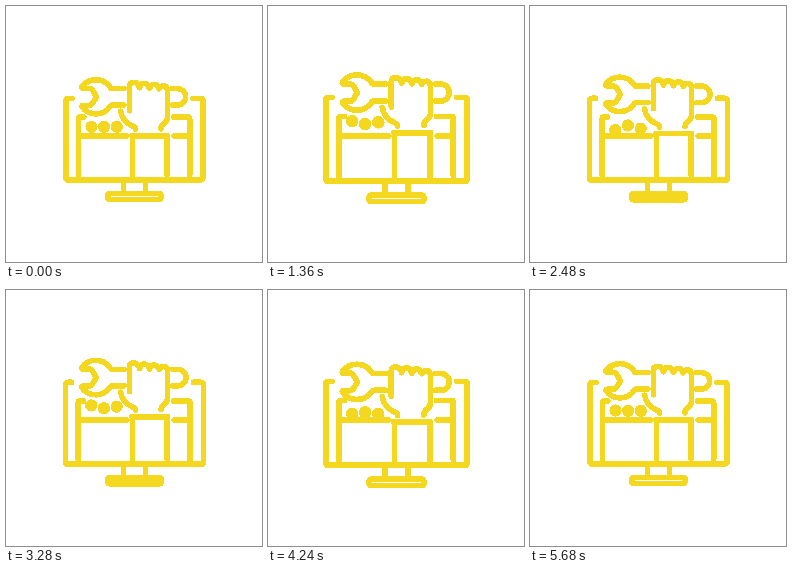
Recreate the animation shown at these times as an HTML page. Size 256 by 256 pixels, loop 5.76 s.

```html
<!DOCTYPE html>
<html lang="en">
<head>
<meta charset="utf-8">
<title>Repair icon</title>
<style>
  html, body { margin: 0; height: 100%; overflow: hidden; background: #fff; }
  svg { display: block; width: 100vw; height: 100vh; shape-rendering: crispEdges; }
  .line { fill: none; stroke: #f3d81f; stroke-width: 5.6; stroke-linecap: round; stroke-linejoin: round; }
  circle { fill: #f3d81f; }
</style>
</head>
<body>
<svg viewBox="0 0 256 256">
  <g id="icon">
    <g class="line">
      <!-- monitor and stand -->
      <path d="M66 92.5H62.5Q60 92.5 60 95V171.5Q60 174 62.5 174H194.5Q197 174 197 171.5V95Q197 92.5 194.5 92.5H187"/>
      <path d="M117.500 175V187M139.500 175V187"/>
      <rect x="102" y="187.500" width="53" height="6" rx="1.500"/>
      <!-- browser window -->
      <path d="M78 111H74.500Q72.500 111 72.500 113V169M72.500 130H121"/>
      <path d="M167.500 111H182Q183.700 111 183.700 113V169M168 130H183.700"/>
      <path id="forearm"/>
    </g>
    <circle r="6.100" cx="85.500"/>
    <circle r="6.100" cx="98"/>
    <circle r="6.100" cx="110.800"/>
    <g id="hand" class="line">
      <!-- wrench, centred on y = 0 -->
      <path d="M118 -8.200H106.500Q104.800 -8.200 104 -10A17.300 17.300 0 0 0 76 -10Q75.500 -8.500 77 -8.500H83Q85.500 -8.500 87 -6L90.500 0L87 6Q85.500 8.500 83 8.500H77Q75.500 8.500 76 10A17.300 17.300 0 0 0 104 10Q104.800 8.200 106.500 8.200H118"/>
      <path d="M166.500 -8.200H171.500a8.200 8.200 0 0 1 0 16.400H166.500"/>
      <!-- fist and thumb -->
      <path d="M123.500 14V-11Q123.500 -14.500 128 -14.500Q132 -14.500 133.500 -9Q134.500 -13.500 138 -13.500Q142 -13.500 143.500 -8.500Q145 -12.500 148 -12.500Q151.500 -12.500 153 -8Q154.500 -11 158 -11Q161.500 -10.500 161.500 -6V20Q161.500 24 158 26.500Q155 28.500 155 32"/>
      <path d="M114.700 14.500Q116 24.500 127 29.500Q129.500 30.500 129.500 32.500"/>
    </g>
  </g>
</svg>
<script>
const LOOP = 5760, CYCLE = 1920, STEP = 80;
const $ = selector => document.querySelector(selector);
const dots = [...document.querySelectorAll('circle')];
const dotKeys = [[480, 1280, 1920], [200, 900, 1760], [340, 1140, 1800]];
const wave = u => (1 - Math.cos(Math.PI * u)) / 2;

// Rest, dip, rise and return to rest, eased between the three key times.
function hop(t, [low, high, end], rest, bottom, top) {
  const keys = [[0, rest], [low, bottom], [high, top], [end, rest]];
  for (let i = 1; i < keys.length; i++) {
    const [t0, y0] = keys[i - 1], [t1, y1] = keys[i];
    if (t < t1) return y0 + (y1 - y0) * wave((t - t0) / (t1 - t0));
  }
  return rest;
}

function draw(now) {
  const time = Math.floor(now % LOOP / STEP) * STEP;
  const t = time % CYCLE;
  const scale = 1 + 0.03 * wave(time / 1440);
  $('#icon').setAttribute('transform', `translate(128 128) scale(${scale}) translate(-128 -128)`);

  const y = hop(t, [320, 880, 1640], 90.8, 93.6, 80.7);
  const cuff = y + 39;
  $('#hand').setAttribute('transform', `translate(0 ${y})`);
  $('#forearm').setAttribute('d', `M126.5 169V${cuff}M126 ${cuff}H161.5M161 ${cuff}V169`);
  dots.forEach((dot, i) => dot.setAttribute('cy', hop(t, dotKeys[i], 120.8, 124.2, 115.3)));
}

function frame(now) {
  draw(now);
  requestAnimationFrame(frame);
}
draw(0);
requestAnimationFrame(frame);
</script>
</body>
</html>
```
